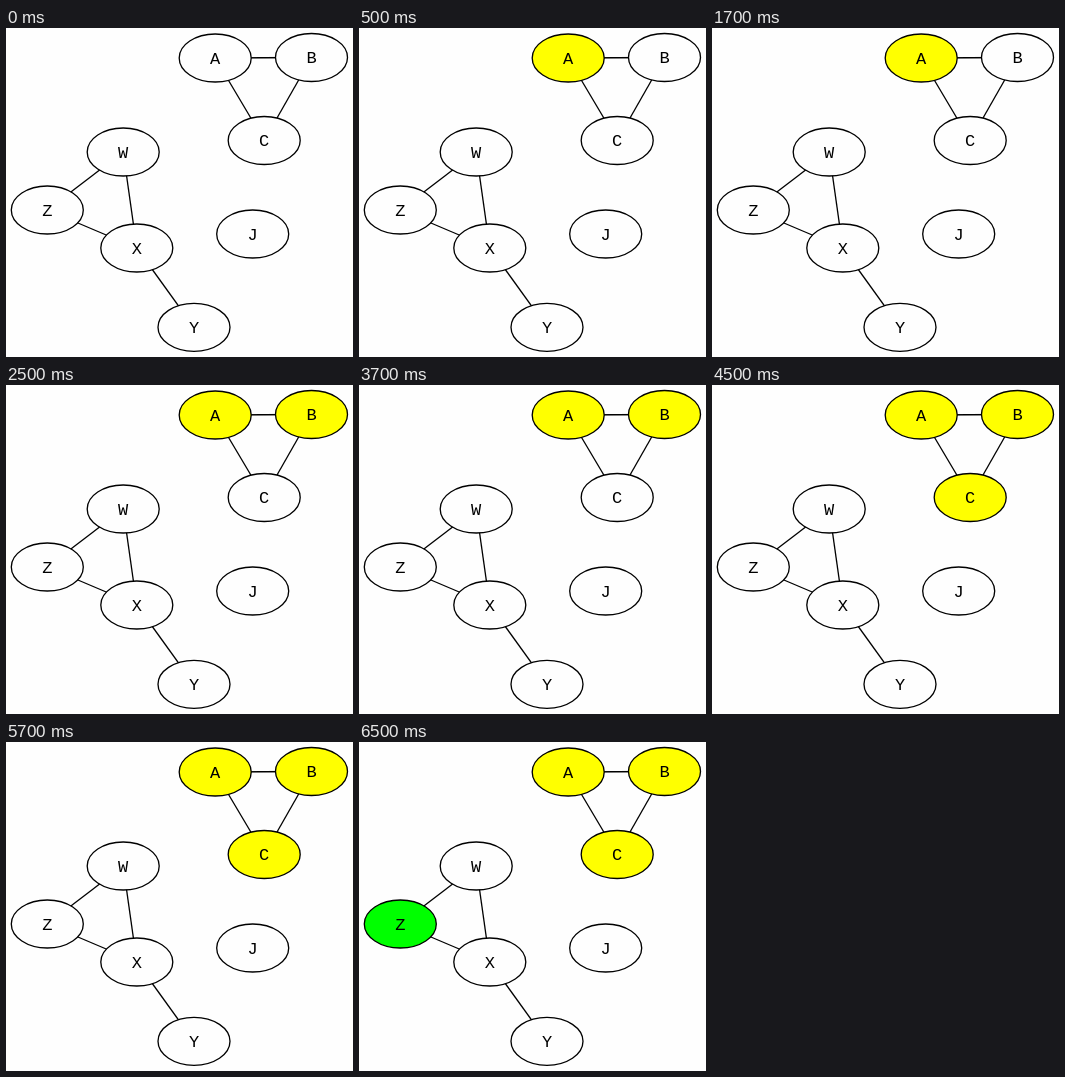
Animation, 347 px wide and 329 px high, one loop 8 s. Source, as an HTML page with a canvas:

```html
<!DOCTYPE html>
<html lang="en">
<head>
<meta charset="utf-8">
<title>Graph traversal</title>
<style>
html, body { margin: 0; width: 100%; height: 100%; overflow: hidden; background: #fefefe; }
canvas { display: block; width: 347px; height: 329px; }
</style>
</head>
<body>
<canvas id="stage"></canvas>
<script>
const W = 347, H = 329, LOOP = 8000;
const PAPER = '#fefefe', YELLOW = '#ffff00', GREEN = '#00ff00';
const nodes = {
  A: { x: 209.2, y: 30, at: 500, fill: YELLOW },
  B: { x: 305.5, y: 29.5, at: 2500, fill: YELLOW },
  C: { x: 258.2, y: 112.5, at: 4500, fill: YELLOW },
  W: { x: 117.2, y: 124 },
  Z: { x: 41.3, y: 182, at: 6500, fill: GREEN },
  X: { x: 130.8, y: 220 },
  J: { x: 246.7, y: 206 },
  Y: { x: 188, y: 299.3 }
};
const edges = ['AB', 'AC', 'BC', 'WZ', 'WX', 'ZX', 'XY'];

const canvas = document.getElementById('stage');
const ctx = canvas.getContext('2d');
const ratio = window.devicePixelRatio || 1;
canvas.width = W * ratio;
canvas.height = H * ratio;
ctx.scale(ratio, ratio);
ctx.font = '17px "Courier New", "Liberation Mono", monospace';
ctx.textAlign = 'center';
ctx.lineWidth = 1.33;
ctx.strokeStyle = '#000';

function drawEdge([from, to]) {
  const a = nodes[from], b = nodes[to];
  ctx.beginPath();
  ctx.moveTo(a.x, a.y);
  ctx.lineTo(b.x, b.y);
  ctx.stroke();
}

function drawNode(label, { x, y, at, fill }, time) {
  ctx.beginPath();
  ctx.ellipse(x, y, 36, 24, 0, 0, Math.PI * 2);
  ctx.fillStyle = time >= at ? fill : PAPER;
  ctx.fill();
  ctx.stroke();
  ctx.fillStyle = '#000';
  ctx.fillText(label, x, y + 5.5);
}

function draw(time) {
  ctx.fillStyle = PAPER;
  ctx.fillRect(0, 0, W, H);
  edges.forEach(drawEdge);
  for (const label in nodes) drawNode(label, nodes[label], time);
}

const start = performance.now();
function tick() {
  draw((performance.now() - start) % LOOP);
  requestAnimationFrame(tick);
}
tick();
</script>
</body>
</html>
```
